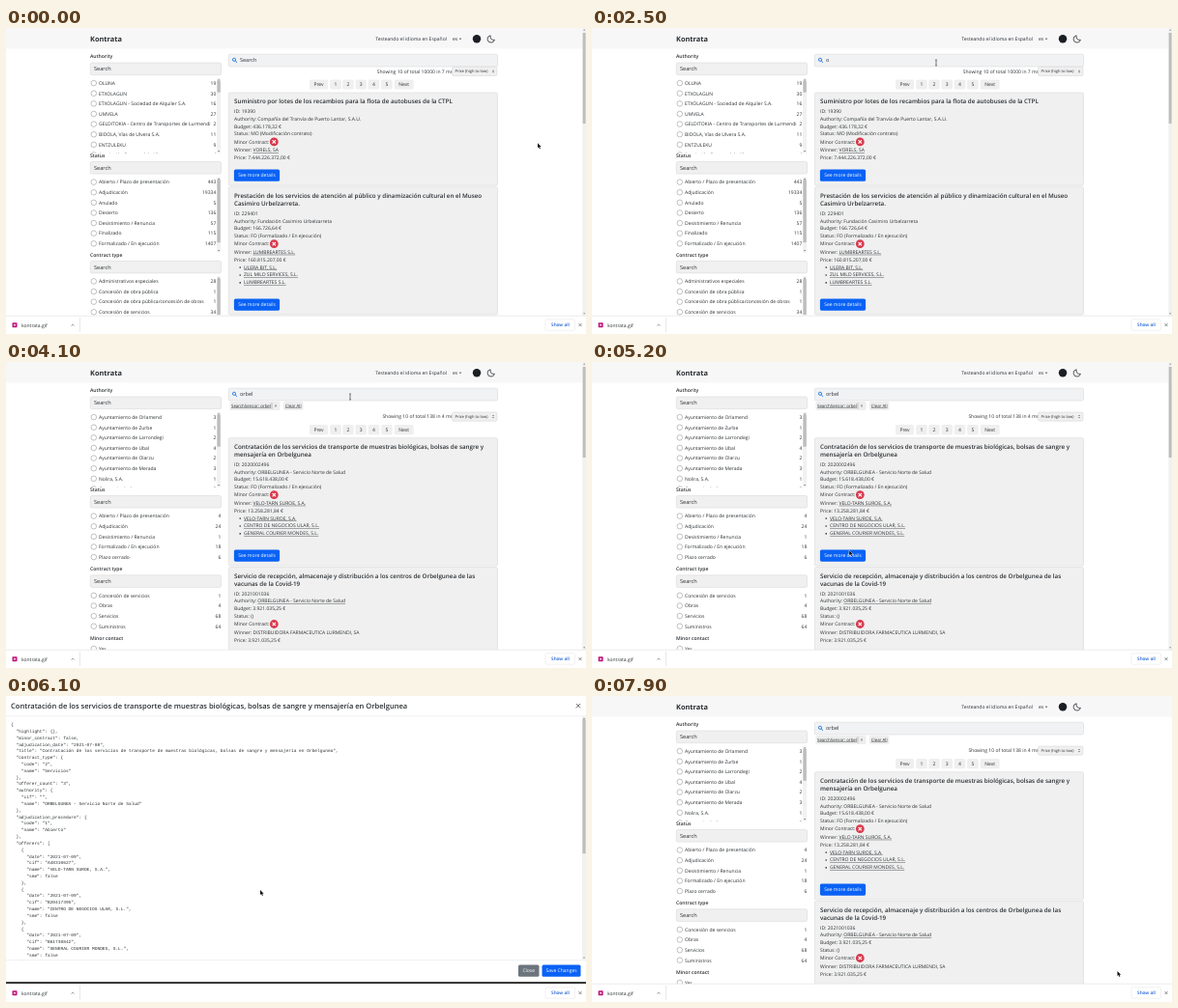
These frames come from a looping animation (600x317 px, 8 s). An HTML page with a canvas:

```html
<!DOCTYPE html>
<html lang="es">
<head>
<meta charset="utf-8">
<title>Kontrata</title>
<style>
html, body { margin: 0; width: 100%; height: 100%; overflow: hidden; background: #fff; }
canvas { display: block; width: 600px; height: 317px; }
</style>
</head>
<body>
<canvas id="stage"></canvas>
<script>
const W = 600, H = 317, LOOP = 8000, FOLD = 298;
const SANS = '"Open Sans", "Noto Sans", sans-serif';
const MONO = '"Liberation Mono", monospace';
const INK = '#2b2f33', BLUE = '#0a62f5', GREY = '#f0f0f0', EDGE = '#d2d2d2';

const canvas = document.getElementById('stage');
const ctx = canvas.getContext('2d');
const dpr = window.devicePixelRatio || 1;
canvas.width = W * dpr;
canvas.height = H * dpr;

// ---------- content ----------
const TITLE = 'Contratación de los servicios de transporte de muestras biológicas, bolsas de sangre y mensajería en Orbelgunea';
const BIDDERS = ['VELO-TARN SUROE, S.A.', 'CENTRO DE NEGOCIOS ULAR, S.L.', 'GENERAL COURIER MONDES, S.L.'];
const AGENCY = 'ORBELGUNEA - Servicio Norte de Salud';

const AUTH_ALL = [['OLUNA', 19], ['ETXOLAGUN', 30], ['ETXOLAGUN - Sociedad de Alquiler S.A.', 16],
  ['UMVELA', 27], ['GELDITOKIA - Centro de Transportes de Lurmendi', 2],
  ['BIDOLA, Vías de Ulvera S.A.', 11], ['ENTZULEKU', 9], ['Asociación Comarcal de Ulvera', 4]];
const AUTH_HIT = [['Ayuntamiento de Orlamend', 3], ['Ayuntamiento de Zurbe', 1], ['Ayuntamiento de Larrondegi', 2],
  ['Ayuntamiento de Ubal', 4], ['Ayuntamiento de Olarzu', 2], ['Ayuntamiento de Merada', 3],
  ['Nolira, S.A.', 1], ['Consorcio de Aguas', 2]];
const STATUS_ALL = [['Abierto / Plazo de presentación', 443], ['Adjudicación', 19334], ['Anulado', 5],
  ['Desierto', 136], ['Desistimiento / Renuncia', 57], ['Finalizado', 115], ['Formalizado / En ejecución', 1407]];
const STATUS_HIT = [['Abierto / Plazo de presentación', 4], ['Adjudicación', 24], ['Desistimiento / Renuncia', 1],
  ['Formalizado / En ejecución', 18], ['Plazo cerrado', 6]];
const TYPE_ALL = [['Administrativos especiales', 28], ['Concesión de obra pública', 1],
  ['Concesión de obra pública/concesión de obras', 1], ['Concesión de servicios', 34]];
const TYPE_HIT = [['Concesión de servicios', 1], ['Obras', 4], ['Servicios', 68], ['Suministros', 64]];

// Text after "|" is underlined.
const CARDS_ALL = [{
  title: ['Suministro por lotes de los recambios para la flota de autobuses de la CTPL'],
  lines: ['ID: 19390', 'Authority: Compañía del Tranvía de Puerto Lantar, S.A.U.', 'Budget: 436.178,32 €',
    'Status: MO (Modificación contrato)', 'Minor Contract:', 'Winner: |VORELS, SA', 'Price: 7.444.226.372,00 €'],
  list: []
}, {
  title: ['Prestación de los servicios de atención al público y dinamización cultural en el Museo', 'Casimiro Urbelzarreta.'],
  lines: ['ID: 229401', 'Authority: Fundación Casimiro Urbelzarreta', 'Budget: 166.726,64 €',
    'Status: FO (Formalizado / En ejecución)', 'Minor Contract:', 'Winner: |LUMBREARTES S.L.', 'Price: 160.815.207,00 €'],
  list: ['ULERA BIT, S.L.', 'ZUL MILD SERVICES, S.L.', 'LUMBREARTES S.L.']
}];
const CARDS_HIT = [{
  title: ['Contratación de los servicios de transporte de muestras biológicas, bolsas de sangre y', 'mensajería en Orbelgunea'],
  lines: ['ID: 2020002496', 'Authority: ' + AGENCY, 'Budget: 15.618.438,00 €',
    'Status: FO (Formalizado / En ejecución)', 'Minor Contract:', 'Winner: |' + BIDDERS[0], 'Price: 13.258.281,84 €'],
  list: BIDDERS
}, {
  title: ['Servicio de recepción, almacenaje y distribución a los centros de Orbelgunea de las', 'vacunas de la Covid-19'],
  lines: ['ID: 2021001036', 'Authority: |' + AGENCY, 'Budget: 3.921.035,25 €', 'Status: ()', 'Minor Contract:',
    'Winner: DISTRIBUIDORA FARMACEUTICA LURMENDI, SA', 'Price: 3.921.035,25 €'],
  list: []
}];

const CIFS = ['A48310627', 'B20417395', 'B61730842'];
const DETAIL = JSON.stringify({
  highlight: {}, minor_contract: false, adjudication_date: '2021-07-08', title: TITLE,
  contract_type: { code: '2', name: 'Servicios' }, offerer_count: '3',
  authority: { cif: '', name: AGENCY },
  adjudication_procedure: { code: '1', name: 'Abierto' },
  offerers: BIDDERS.map((name, i) => ({ date: '2021-07-09', cif: CIFS[i], name, sme: false }))
}, null, 2).split('\n');

// ---------- drawing helpers ----------
// y is the middle of the capitals; returns the text width.
function text(s, x, y, { size = 5, weight = 400, color = INK, align = 'left', font = SANS, line = false } = {}) {
  ctx.font = `${weight} ${size}px ${font}`;
  ctx.textAlign = align;
  ctx.fillStyle = color;
  const base = y + size * 0.357;
  ctx.fillText(s, x, base);
  const w = ctx.measureText(s).width;
  if (line) ctx.fillRect(x, base + 0.6, w, 0.4);
  return w;
}

function box(x, y, w, h, fill, edge, r = 1.6) {
  ctx.beginPath();
  ctx.roundRect(x, y, w, h, r);
  ctx.fillStyle = fill;
  ctx.fill();
  if (edge) stroke(edge, 0.5);
}

function stroke(color, width) {
  ctx.strokeStyle = color;
  ctx.lineWidth = width;
  ctx.stroke();
}

function disc(x, y, r, fill) {
  ctx.beginPath();
  ctx.arc(x, y, r, 0, 7);
  ctx.fillStyle = fill;
  ctx.fill();
}

function ring(x, y, r, color, width) {
  ctx.beginPath();
  ctx.arc(x, y, r, 0, 7);
  stroke(color, width);
}

function poly(points, color, width) {
  ctx.beginPath();
  points.forEach(([x, y]) => ctx.lineTo(x, y));
  stroke(color, width);
}

function cross(x, y, r, color, width) {
  poly([[x - r, y - r], [x + r, y + r]], color, width);
  poly([[x - r, y + r], [x + r, y - r]], color, width);
}

function wedge(x, y, dir, r = 1.1, color = '#444') {
  ctx.beginPath();
  ctx.moveTo(x - r, y - dir * r / 2);
  ctx.lineTo(x + r, y - dir * r / 2);
  ctx.lineTo(x, y + dir * r / 2);
  ctx.fillStyle = color;
  ctx.fill();
}

function clipped(x, y, w, h, draw) {
  ctx.save();
  ctx.beginPath();
  ctx.rect(x, y, w, h);
  ctx.clip();
  draw();
  ctx.restore();
}

function scrollbar(x, y, w, h, from, to) {
  ctx.fillStyle = '#f1f1f1';
  ctx.fillRect(x, y, w, h);
  ctx.fillStyle = '#bdbdbd';
  ctx.fillRect(x + 0.4, from, w - 0.8, to - from);
  wedge(x + w / 2, y + 2, -1, w / 4);
  wedge(x + w / 2, y + h - 2, 1, w / 4);
}

function button(label, x, y, w, fill, focus) {
  if (focus) box(x - 0.8, y - 6.9, w + 1.6, 13.8, '#8fb6f5', null, 2.2);
  box(x, y - 6.1, w, 12.2, fill);
  text(label, x + w / 2, y, { color: '#fff', align: 'center' });
}

// ---------- page parts ----------
function nav() {
  ctx.fillStyle = '#f7f7f8';
  ctx.fillRect(-5, 0, W + 10, 21.5);
  text('Kontrata', 87, 11, { size: 7.4, weight: 700 });
  text('Testeando el idioma en Español', 382.3, 11);
  text('es', 462, 11);
  wedge(470, 11.4, 1, 1.3, INK);
  disc(487, 11.2, 4.2, '#1b1f23');
  ctx.beginPath();
  ctx.arc(501.8, 11.4, 3.7, -1.75, 3.1, true);
  ctx.arc(501.8, 11.4, 3.7, 3.1, 0.25, true);
  ctx.quadraticCurveTo(500.6, 13, 501.1, 7.8);
  ctx.closePath();
  stroke(INK, 0.8);
}

function radio(y, label) {
  ring(90.8, y, 2.8, '#858585', 0.5);
  text(label, 96, y);
}

function facet(title, y, rows, { height = 0, thumb = 0 } = {}) {
  text(title, 87, y - 0.2, { weight: 600, size: 5.1 });
  box(87.3, y + 6.3, 135.2, 12.6, GREY, EDGE);
  text('Search', 91, y + 12.6, { size: 5.6 });
  const top = y + 22, right = thumb ? 217.3 : 222.3;
  clipped(85, top, 140, height || FOLD - top, () => {
    rows.forEach(([name, count], i) => {
      const ry = y + 27.4 + i * 10.62;
      radio(ry, name);
      text(count, right, ry, { align: 'right' });
    });
    if (thumb) scrollbar(218, top, 4.2, height || 80, top + 3, top + thumb);
  });
}

function sidebar({ hitNames, hitSide }) {
  facet('Authority', 29.7, hitNames ? AUTH_HIT : AUTH_ALL, { height: 78, thumb: hitNames ? 36 : 15 });
  if (!hitSide) {
    facet('Status', 132.2, STATUS_ALL, { height: 78.5, thumb: 68 });
    facet('Contract type', 235, TYPE_ALL, { thumb: 40 });
    return;
  }
  facet('Status', 132.2, STATUS_HIT);
  facet('Contract type', 214.5, TYPE_HIT);
  text('Minor contact', 87, 286, { weight: 600, size: 5.1 });
  radio(297, 'Yes');
}

function searchBar({ query, caret }) {
  box(230.3, 27.2, 278.2, 12.8, '#f1f2f4', EDGE);
  ring(236, 32.8, 1.6, '#0b6ae0', 0.8);
  poly([[237.2, 34], [239, 35.8]], '#0b6ae0', 0.9);
  text(query || 'Search', 242, 33.5, { size: 5.5 });
  if (caret) {
    ctx.fillStyle = INK;
    ctx.fillRect(242, 30, 0.6, 7);
  }
}

function chips(query) {
  box(231.5, 41, 52, 9, '#eee');
  text('SearchSensor: ' + query, 233, 45.4, { size: 4.4, line: true });
  poly([[275, 42.2], [275, 48.8]], '#888', 0.5);
  cross(279, 45.4, 0.8, INK, 0.5);
  box(287, 41, 20.5, 9, '#eee');
  text('Clear All', 288.8, 45.4, { size: 4.4, line: true });
}

function toolbar(y, hit) {
  text(hit ? 'Showing 10 of total 138 in 4 ms' : 'Showing 10 of total 10000 in 7 ms', 462, y, { align: 'right' });
  box(461.5, y - 4.7, 46.5, 9.2, GREY, EDGE);
  text('Price (high to low)', 464.5, y, { size: 4.1 });
  wedge(504, y - 1.1, -1, 1);
  wedge(504, y + 1.1, 1, 1);
  const pages = [['Prev', 323.5, 19], ['1', 341, 11.5], ['2', 354, 11.5], ['3', 367.2, 11.5],
    ['4', 380.5, 11.5], ['5', 393.9, 11.5], ['Next', 411.7, 20]];
  for (const [label, x, w] of pages) {
    box(x - w / 2, y + 8.4, w, 10.2, '#efefef');
    text(label, x, y + 13.5, { align: 'center' });
  }
}

// Draws one result and returns the top of the next.
function card({ title, lines, list }, top, fill, focus) {
  const offsets = [0, 7.6, 15.4, 23.2, 31.4, 40.2, 48];
  const first = top + 9 + (title.length - 1) * 8 + 10.5;
  const last = first + 48 + list.length * 7.9;
  const action = last + (list.length ? 22.7 : 18.2);
  box(230.3, top, 278.2, action + 10.5 - top, GREY, EDGE);
  title.forEach((s, i) => text(s, 236, top + 8.8 + i * 8, { size: 6.25, weight: 600 }));
  lines.forEach((s, i) => {
    const y = first + offsets[i], [label, link] = s.split('|');
    const w = text(label, 236, y);
    if (link) text(link, 236 + w, y, { line: true });
    if (i === 4) {
      disc(277.3, y, 4.4, '#d9374a');
      cross(277.3, y, 1.7, '#fff', 1.2);
    }
  });
  list.forEach((s, i) => {
    const y = first + 55.6 + i * 7.9;
    disc(242.2, y + 0.3, 0.8, INK);
    text(s, 246, y, { line: true });
  });
  button('See more details', 235.9, action, 47.2, fill, focus);
  return action + 12;
}

function page(s) {
  const drop = s.chip ? 11.7 : 0;
  ctx.save();
  ctx.translate(s.shift, 0);
  nav();
  sidebar(s);
  searchBar(s);
  if (s.chip) chips(s.query);
  toolbar(45 + drop, s.hitMain);
  const [a, b] = s.hitMain ? CARDS_HIT : CARDS_ALL;
  const next = card(a, 67 + drop, s.hover ? '#0b50c0' : BLUE, s.focus);
  card(b, next, BLUE);
  ctx.restore();
  if (s.scroll) scrollbar(596.3, 0, 3.7, FOLD, 5, 99);
}

function modal(offset, hover) {
  ctx.save();
  ctx.translate(0, offset);
  ctx.fillStyle = '#fff';
  ctx.fillRect(0, 0, W, FOLD);
  text(TITLE, 5, 12, { size: 7.55, weight: 600 });
  cross(592, 12, 2.2, '#444', 0.8);
  clipped(0, 22, W, 253.5, () => {
    DETAIL.forEach((s, i) => text(s, 5, 31.3 + i * 6.82, { size: 4.53, font: MONO }));
    scrollbar(596, 23, 4, 252, 26, 165);
  });
  poly([[0, 22.6], [W, 22.6]], '#dee2e6', 0.5);
  poly([[0, 275.5], [W, 275.5]], '#dee2e6', 0.5);
  button('Close', 530, 286.5, 21.5, hover ? '#565e64' : '#6c757d');
  button('Save Changes', 554.5, 286.5, 40, BLUE);
  ctx.restore();
}

function downloads() {
  ctx.fillStyle = '#fff';
  ctx.fillRect(0, FOLD, W, H - FOLD);
  poly([[0, FOLD + 0.2], [W, FOLD + 0.2]], '#d5d5d5', 0.5);
  box(6.5, 305.2, 5, 5, '#c2187f', null, 0.6);
  disc(9, 307.7, 0.9, '#fff');
  text('kontrata.gif', 16, 307.8);
  poly([[67.6, 308.5], [69, 307.1], [70.4, 308.5]], '#555', 0.6);
  poly([[76.5, 300], [76.5, 315]], '#d0d0d0', 0.5);
  box(558, 301.8, 30.5, 11.4, '#fff', '#e2e2e2', 1);
  text('Show all', 573.4, 307.6, { color: '#1a5cd0', weight: 600, size: 4.7, align: 'center' });
  cross(594, 307.6, 1.5, '#444', 0.6);
}

// ---------- pointer ----------
const MOVES = [[900, 1600, 550, 119.3, 356, 36], [4400, 5300, 356, 36, 263, 201],
  [6200, 7200, 263, 201, 543.5, 284]];
const KINDS = [[0, 'arrow'], [1500, 'beam'], [4600, 'arrow'], [5300, 'hand'],
  [6000, 'arrow'], [7200, 'hand'], [7900, 'arrow']];

function pointer(t) {
  const [t0, t1, x0, y0, x1, y1] = MOVES.findLast(m => t >= m[0]) || MOVES[0];
  const u = Math.min(1, Math.max(0, (t - t0) / (t1 - t0)));
  const e = u * u * (3 - 2 * u);
  const kind = KINDS.findLast(k => t >= k[0])[1];
  ctx.save();
  ctx.translate(x0 + (x1 - x0) * e, y0 + (y1 - y0) * e + (t >= 7900 ? 1 : 0));
  ctx.lineJoin = 'round';
  if (kind === 'beam') {
    poly([[0, -3], [0, 3]], '#222', 0.6);
    poly([[-1, -3], [1, -3]], '#222', 0.5);
    poly([[-1, 3], [1, 3]], '#222', 0.5);
  } else {
    const shape = kind === 'arrow'
      ? 'M0 0V5L1.2 4L2 5.9L2.9 5.5L2.1 3.7H3.7Z'
      : 'M0.6 0.2Q1.1-.4 1.6.2V2.3L3.8 2.8Q4.3 3 4.1 3.8L3.6 6H1.2L-.5 3.9Q-.4 3 .6 3.6Z';
    const path = new Path2D(shape);
    ctx.strokeStyle = '#fff';
    ctx.lineWidth = 0.9;
    ctx.stroke(path);
    ctx.fillStyle = '#111';
    ctx.fill(path);
  }
  ctx.restore();
}

// ---------- timeline ----------
function typed(t) {
  if (t < 2500) return '';
  return 'orbel'.slice(0, t < 2800 ? 1 : Math.min(5, 2 + Math.floor((t - 2800) / 100)));
}

function modalOffset(t) {
  if (t < 6100) return -8;
  if (t < 6200) return -1.8;
  return t < 7700 ? 0 : -1.5;
}

function draw(t) {
  ctx.setTransform(dpr, 0, 0, dpr, 0, 0);
  ctx.textRendering = 'geometricPrecision';
  ctx.fillStyle = '#fff';
  ctx.fillRect(0, 0, W, H);
  const open = t >= 6000 && t < 7900;
  if (!open || t < 6100) {
    page({
      query: typed(t),
      caret: t >= 2200 && t < 2500,
      chip: t >= 3100,
      hitMain: t >= 3800,
      hitNames: t >= 3800,
      hitSide: t >= 4100,
      scroll: t < 5800,
      shift: t >= 5800 && t < 7900 ? 2.5 : 0,
      hover: t >= 5300 && t < 7900,
      focus: t >= 5600 && t < 7900
    });
  }
  if (open) {
    const fading = t < 6100;
    ctx.fillStyle = fading ? 'rgba(0,0,0,.4)' : '#111';
    ctx.fillRect(0, 0, W, FOLD);
    ctx.globalAlpha = fading ? 0.8 : 1;
    modal(modalOffset(t), t >= 7200);
    ctx.globalAlpha = 1;
  }
  downloads();
  pointer(t);
}

// The screen refreshes ten times a second.
const start = performance.now();
function tick() {
  const t = (performance.now() - start) % LOOP;
  draw(Math.floor(t / 100) * 100);
  requestAnimationFrame(tick);
}
tick();
</script>
</body>
</html>
```
